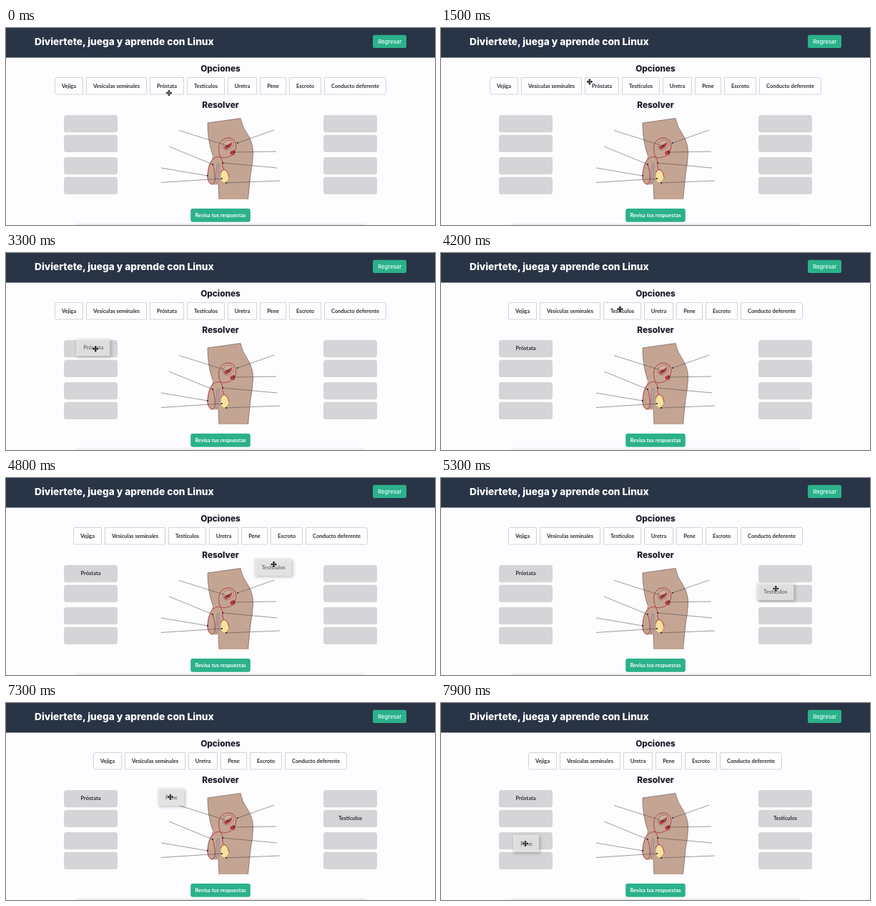
Animation, 600 px wide and 276 px high, one loop 8 s. Source, as an HTML page:

```html
<!DOCTYPE html>
<html lang="es">
<head>
<meta charset="utf-8">
<title>Opciones</title>
<style>
  html, body { margin: 0; width: 100%; height: 100%; overflow: hidden; background: #fdfcfe; }
  svg { display: block; width: 600px; height: 276px; }
  text { font: 700 7.5px Lato, "Open Sans", sans-serif; text-anchor: middle; fill: #2c2c32; }
  .head { font: 800 11.8px Inter, "Open Sans", sans-serif; fill: #1b1c28; }
  .title { font-size: 13.7px; text-anchor: start; fill: #fff; }
  .back { font: 500 7.7px Inter, "Open Sans", sans-serif; fill: #e9fff8; }
  .check { fill: #fff; }
  .btn { fill: #2bb18b; }
  .slot { fill: #d5d4d7; }
  .box { fill: #fefdff; stroke: #d3d2d8; }
  .tube { fill: none; stroke: #b5424b; stroke-width: 1; }
  .ink { fill: none; stroke: #5c4844; stroke-width: .6; }
  #leaders path { stroke: #4c484e; stroke-width: .55; marker-end: url(#dot); }
</style>
</head>
<body>
<svg viewBox="0 0 600 276">
  <defs>
    <filter id="soft" x="-30%" y="-60%" width="160%" height="220%">
      <feGaussianBlur stdDeviation="2.3"/>
    </filter>
    <marker id="dot" viewBox="-1 -1 2 2" markerWidth="1.9" markerHeight="1.9" markerUnits="userSpaceOnUse">
      <circle r="1" fill="#1c181a"/>
    </marker>
  </defs>
  <rect width="600" height="276" fill="#fdfcfe"/>
  <rect width="600" height="41.5" fill="#293546"/>
  <text class="head title" x="40" y="23.8">Diviertete, juega y aprende con Linux</text>
  <rect class="btn" x="513" y="9.7" width="47" height="18.3" rx="2.5"/>
  <text class="back" x="536.7" y="21.7">Regresar</text>
  <text class="head" x="300" y="61.2">Opciones</text>
  <text class="head" x="300" y="112">Resolver</text>
  <rect x="98" y="276" width="404" height="8" fill="#777" opacity=".35" filter="url(#soft)"/>
  <rect class="btn" x="258.2" y="253" width="83.6" height="18.7" rx="3"/>
  <text class="check" x="300" y="265">Revisa tus respuestas</text>
  <g id="slots"></g>

  <g id="diagram">
    <path fill="#c4a593" d="M282 133L328 126.5Q330 138 338 149Q346 162 345.5 176Q345 190 342 205L338.5 240H298L297 219Q291 220 286 219Q280 213 282 202Q283 192 288 184L289 178Q282 158 282 133Z"/>
    <path class="ink" d="M282 133L328 126.5Q330 138 338 149Q346 162 345.5 176Q345 190 342 205L338.5 240M282 133Q282 158 289 178M297 219L298 240"/>
    <path fill="#b7a1a0" stroke="#80696a" stroke-width=".5" d="M293 217Q294 202 295 191Q298 187 298 194L297 215Q295 219 293 217Z"/>
    <path class="tube" d="M288 219Q281 216 282 206Q283 191 289 184Q296 178 304 182Q314 181 318 176M288 219Q293 219 292 205Q291 194 288 190"/>
    <path class="tube" d="M305 200Q302 194 303 187Q296 175 298 164Q302 153 313 154Q322 156 322 166L319 178"/>
    <path fill="#d2ada0" stroke="#8e4d4c" stroke-width=".6" d="M303 165Q305 157 313 157Q319 159 318 165Q314 171 307 171Q303 169 303 165Z"/>
    <path fill="#a9434a" d="M304.500 166Q310 164 316 160Q317 167 308 170Q305 169 304.500 166Z"/>
    <path fill="#b23a45" d="M313 175Q315 171 319.500 171Q321 176 317 178.500Q314 177 313 175Z"/>
    <path fill="#f5e2a0" stroke="#b7894c" stroke-width=".7" d="M300 209Q300 200 305 198Q311 200 312 208Q311 216 305 217Q300 216 300 209Z"/>
    <path class="tube" d="M300 203Q303 197 307 199Q311 202 312 209"/>
  </g>
  <g id="leaders">
    <path d="M242 143.500L310 165"/><path d="M375 143L324 161"/>
    <path d="M228 166L289 191"/><path d="M378 173L319 174"/>
    <path d="M217 196L282 207"/><path d="M379 196L303 189"/>
    <path d="M217 216.500L302 211"/><path d="M383 214L308 217"/>
  </g>
  <g id="options"></g>
  <g id="ghost"></g>

  <path id="move" d="M0-4.3L2-2.200H.6V-.6H2.200V-2L4.300 0L2.200 2V.6H.6V2.200H2L0 4.300L-2 2.200H-.6V.6H-2.200V2L-4.300 0L-2.200-2V-.6H-.6V-2.200H-2Z" stroke="#fff" stroke-width=".8" stroke-linejoin="round" paint-order="stroke"/>
  <path id="arrow" d="M0 0V8L1.900 6.300L3.200 9.100L4.500 8.500L3.200 5.800H5.700Z" stroke="#fff" stroke-width=".7"/>
  <path id="beam" d="M-1.700-4.500Q0-4.500 0-3.300Q0-4.500 1.700-4.500M0-3.300V3.300M-1.700 4.500Q0 4.500 0 3.300Q0 4.500 1.700 4.500" fill="none" stroke="#555" stroke-width=".7"/>
</svg>
<script>
const $ = id => document.getElementById(id);
const LOOP = 8000, STEP = 100, TOP = 69, HIGH = 24.5, GAP = 4, PAD = 10;
const names = ['Vejiga', 'Vesículas seminales', 'Próstata', 'Testículos',
  'Uretra', 'Pene', 'Escroto', 'Conducto deferente'];

// Pointer moves; those with an item drag it and drop it into a slot.
const moves = [
  { from: 0, to: 900, x: 199, y: 72 },
  { from: 1400, to: 2000, x: 228, y: 83 },
  { from: 2500, to: 3400, x: 124, y: 135, item: 'Próstata', drop: 3400, slot: 0 },
  { from: 3700, to: 4300, x: 254, y: 77 },
  { from: 4500, to: 5400, x: 471, y: 156, item: 'Testículos', drop: 5800, slot: 5 },
  { from: 5700, to: 6400, x: 309, y: 64 },
  { from: 6500, to: 7000, x: 317, y: 81 },
  { from: 7100, to: 7900, x: 118, y: 197, item: 'Pene', drop: LOOP, slot: 2 }
];
moves.reduce((at, m) => {
  m.start = at;
  return m;
}, { x: 228, y: 91 });

const pen = document.createElement('canvas').getContext('2d');
pen.font = '700 75px Lato, "Open Sans", sans-serif';
const widthOf = s => Math.round(pen.measureText(s).width / 10) + 2 * PAD;

const slots = Array.from({ length: 8 }, (_, i) => ({
  x: i < 4 ? 81 : 444,
  y: 122 + 59 * (i % 4 >> 1) + 27.8 * (i % 2)
}));
const label = (s, x, y) => `<text x="${x}" y="${y}">${s}</text>`;
const optionLabel = o => label(o.name, o.x + o.w / 2, 83.8);
const slotLabel = m => label(m.item, slots[m.slot].x + 37.5, slots[m.slot].y + 14.4);

function layout(gone) {
  const left = names.filter(n => !gone.includes(n));
  const total = left.reduce((sum, n) => sum + widthOf(n) + GAP, -GAP);
  let x = Math.floor(300 - total / 2);
  return left.map((name, i) => {
    const o = { name, x, w: widthOf(name), l: i ? 0 : 2.5, r: i < left.length - 1 ? 0 : 2.5 };
    x += o.w + GAP;
    return o;
  });
}

// Only the outer corners of the row are rounded.
function optionBox({ x, w, l, r }) {
  const a = x + .5, b = x + w - .5, t = TOP + .5, u = TOP + HIGH - .5;
  return `<path class="box" d="M${a + l} ${t}H${b - r}Q${b} ${t} ${b} ${t + r}V${u - r}Q${b} ${u} ${b - r} ${u}H${a + l}Q${a} ${u} ${a} ${u - l}V${t + l}Q${a} ${t} ${a + l} ${t}Z"/>`;
}

const ghostSvg = o => `
  <rect x="${o.x + 1}" y="${TOP + 1.5}" width="${o.w}" height="${HIGH}" opacity=".22" filter="url(#soft)"/>
  <rect x="${o.x}" y="${TOP}" width="${o.w - 1}" height="${HIGH - .5}" fill="#e8e8e8" opacity=".85"/>
  <g opacity=".6">${optionLabel(o)}</g>`;

$('slots').innerHTML = slots.map(s =>
  `<rect class="slot" x="${s.x}" y="${s.y}" width="75" height="24.2" rx="3.5"/>`).join('');

function pointer(t) {
  const m = moves.filter(m => m.from <= t).pop();
  const k = Math.min(1, (t - m.from) / (m.to - m.from));
  const e = 1 - (1 - k) ** 2;
  return [m.start.x + (m.x - m.start.x) * e, m.start.y + (m.y - m.start.y) * e];
}

function pointerKind(x, y, items, drag, dropped) {
  const overItem = y >= TOP && y <= TOP + HIGH && items.some(o => x >= o.x - GAP && x <= o.x + o.w);
  const overSlot = dropped.some(({ slot }) => {
    const s = slots[slot];
    return x > s.x && x < s.x + 75 && y > s.y && y < s.y + 24;
  });
  if (drag || overItem || overSlot) return 'move';
  return y > 50 && y < 67 && Math.abs(x - 300) < 28 ? 'beam' : 'arrow';
}

let shown, dragged, items;
function draw(now) {
  const t = Math.floor(now % LOOP / STEP) * STEP;
  const [x, y] = pointer(t);
  const dropped = moves.filter(m => m.item && t >= m.drop);
  const drag = moves.find(m => m.item && t > m.from && t < m.drop);

  if (dropped.length !== shown) {
    shown = dropped.length;
    items = layout(dropped.map(m => m.item));
    $('options').innerHTML = items.map(o => optionBox(o) + optionLabel(o)).join('')
      + dropped.map(slotLabel).join('');
  }
  if (drag !== dragged) {
    dragged = drag;
    $('ghost').innerHTML = drag ? ghostSvg(items.find(o => o.name === drag.item)) : '';
  }
  if (drag) $('ghost').setAttribute('transform', `translate(${x - drag.start.x} ${y - drag.start.y})`);

  const kind = pointerKind(x, y, items, drag, dropped);
  for (const id of ['move', 'arrow', 'beam']) {
    $(id).style.display = id === kind ? '' : 'none';
    $(id).setAttribute('transform', `translate(${x} ${y})`);
  }
}

const begin = performance.now();
function tick() {
  draw(performance.now() - begin);
  requestAnimationFrame(tick);
}
tick();
</script>
</body>
</html>
```
